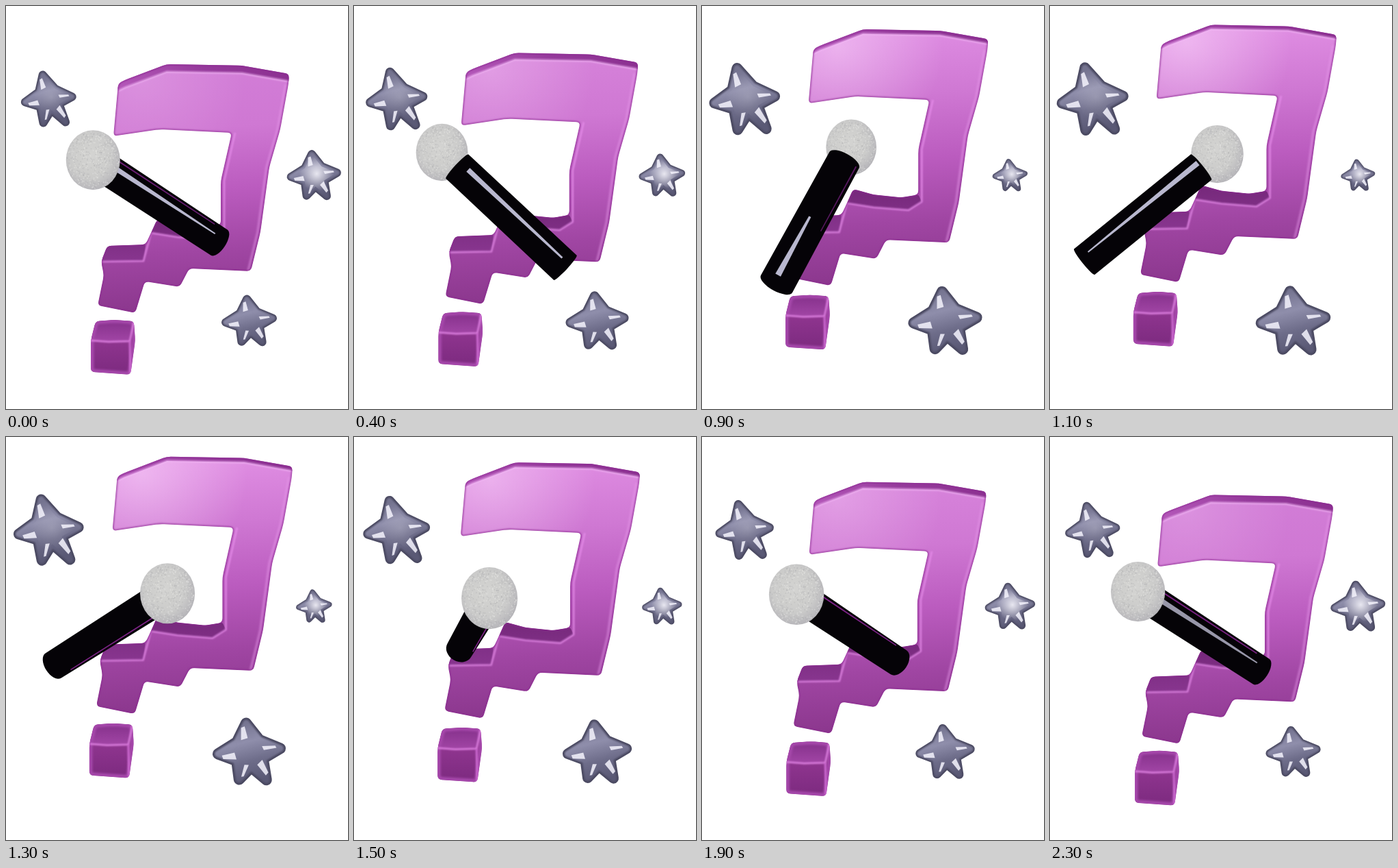
These frames come from a looping animation (500x588 px, 2.4 s). An HTML page with a canvas:

```html
<!DOCTYPE html>
<html lang="en">
<head>
<meta charset="utf-8">
<title>Question mark and microphone</title>
<style>
html, body { margin: 0; width: 100%; height: 100%; overflow: hidden; background: #fff; }
canvas { display: block; }
</style>
</head>
<body>
<canvas id="stage" width="500" height="588"></canvas>
<script>
const ctx = document.getElementById('stage').getContext('2d');
const LOOP = 2400, STEP = 100, TURN = 2 * Math.PI;

const clamp = v => Math.max(0, Math.min(1, v));
const wave = (t, peak, period = LOOP) => Math.cos(TURN * (t - peak) / period);
const rise = (t, peak) => (1 + wave(t, peak)) / 2;

function line(points) {
  const path = new Path2D();
  points.forEach(p => path.lineTo(...p));
  return path;
}
// Closed polygon whose corners are rounded by r
function poly(points, r) {
  const path = new Path2D(), n = points.length;
  const toward = ([x, y], [u, v]) => {
    const k = Math.min(r / Math.hypot(u - x, v - y), 0.5);
    return [x + (u - x) * k, y + (v - y) * k];
  };
  points.forEach((p, i) => {
    path.lineTo(...toward(p, points[(i + n - 1) % n]));
    path.quadraticCurveTo(...p, ...toward(p, points[(i + 1) % n]));
  });
  path.closePath();
  return path;
}
const shift = (points, dx, dy) => points.map(([x, y]) => [x + dx, y + dy]);

function paint(kind, path, color, blur) {
  ctx.filter = blur ? `blur(${blur}px)` : 'none';
  ctx[kind + 'Style'] = color;
  ctx[kind](path);
  ctx.filter = 'none';
}
const fill = (path, color, blur) => paint('fill', path, color, blur);
function stroke(path, color, width, blur) {
  ctx.lineWidth = width;
  paint('stroke', path, color, blur);
}
// Evenly spaced color stops
function blend(gradient, ...colors) {
  colors.forEach((c, i) => gradient.addColorStop(i / (colors.length - 1), c));
  return gradient;
}
const ramp = (x0, y0, x1, y1, ...colors) => blend(ctx.createLinearGradient(x0, y0, x1, y1), ...colors);
const glow = (x, y, r, ...colors) => blend(ctx.createRadialGradient(x, y, 0, x, y, r), ...colors);

// Question mark
const roof = [[164, 113], [174, 108], [235, 85], [345, 87], [414, 99]];
const side = [[413, 114], [401, 180], [385, 235], [372, 330], [358, 387]];
const lowBack = [[148, 350], [204, 348]], lowFront = [[139, 373], [201, 372]];
const highBack = [[221, 311], [250, 319], [290, 323], [314, 319]];
const highFront = [[212, 331], [250, 337], [300, 341], [319, 329]];
const inner = [[314, 255], [330, 185]];
const hook = poly([[157, 190], ...roof, ...side, [268, 383], [254, 410], [203, 402], [189, 448],
  [134, 437], [143, 393], lowFront[0], ...lowBack, highFront[0], ...highBack, ...inner, [225, 180]], 6);
const ledges = [[lowBack, lowFront], [highBack, highFront]]
  .map(([back, front]) => poly([...back, ...[...front].reverse()], 2));

const cubeBack = [[131, 460], [160, 458], [187, 460]];
const cubeFront = [[124, 488], [150, 490], [181, 489]];
const cubeBase = [[182, 538], [124, 534]];
const cube = poly([...cubeBack, [189, 488], ...cubeBase, cubeFront[0]], 6);
const cubeTop = line([...cubeBack, ...[...cubeFront].reverse()]);

function drawHook(q) {
  ctx.save();
  ctx.transform(1 + 0.026 * q, 0, 0, 1 + 0.0353 * q, -5.7 * q, -61 * q);
  ctx.clip(hook);
  const top = `rgb(${210 + 14 * q},${125 + 17 * q},${215 + 12 * q})`;
  fill(hook, ramp(250, 90, 270, 448, top, '#cf78d3', '#bb5cbf', '#a046a3', '#8a368c'));
  fill(hook, glow(200, 110, 150, `rgba(255,225,255,${0.2 + 0.3 * q})`, 'rgba(255,225,255,0)'));
  const rim = shift(roof, 0, 11 - 5 * q);
  fill(line([...rim, [430, 70], [150, 70]]), ramp(160, 0, 415, 0, '#b558ba', '#953a9b', '#8c3191'), 0.7);
  stroke(line(rim), 'rgba(243,184,246,.65)', 3, 1.2);
  ledges.forEach(l => fill(l, ramp(0, 310, 0, 376, '#75287a', '#893690'), 0.6));
  stroke(line([...lowFront, ...highFront, ...shift(inner, 5, 0)]), 'rgba(232,142,236,.8)', 2.5, 1);
  stroke(line(shift(side, -4, 0)), 'rgba(230,150,234,.6)', 3, 1.5);
  stroke(hook, 'rgba(140,44,146,.7)', 3, 0.8);
  ctx.restore();
}

function drawCube(q) {
  ctx.save();
  ctx.transform(1, 0, 0, 1, -2.2 * q, -41.5 * q);
  ctx.clip(cube);
  fill(cube, ramp(0, 488, 0, 538, '#8f358f', '#7c2a7f'));
  fill(cubeTop, ramp(0, 458, 0, 489, '#84308a', '#a145a5'));
  stroke(cube, '#a547aa', 9, 1.5);
  stroke(line([...cubeFront, cubeBack[2]]), '#dd80e0', 2.5, 1);
  stroke(line([cubeFront[2], cubeBase[0]]), '#cd6ad1', 3, 1);
  ctx.restore();
}

// Glass stars: five tips clockwise from the top, relative to the middle
const wide = [[-10, -40], [40, -3], [28, 39], [-9, 41], [-40, 6]];
const slim = [[-4, -37], [40, -4], [22, 36], [-13, 36], [-40, 3]];
const stars = [
  { x: 62.3, y: 135, grow: 0.31, tips: wide, shine: 0.2 },
  { x: 450.3, y: 246.7, grow: -0.38, tips: slim, shine: 0.85 },
  { x: 355.5, y: 459, grow: 0.37, tips: slim, shine: 0 }
];
const reach = ([x, y], r) => [x * r / Math.hypot(x, y), y * r / Math.hypot(x, y)];

function drawStar({ x, y, grow, tips, shine }, s) {
  ctx.save();
  ctx.translate(x, y);
  ctx.scale(1 + grow * s, 1 + grow * s);
  ctx.lineJoin = ctx.lineCap = 'round';
  const valleys = tips.map(([u, v], i) => {
    const [a, b] = tips[(i + 1) % 5];
    return reach([u + a, v + b], 17);
  });
  const shape = line(tips.flatMap((p, i) => [reach(p, Math.hypot(...p) - 6), valleys[i]]));
  shape.closePath();
  fill(shape, '#4b4a62');
  stroke(shape, '#4b4a62', 12);
  const glass = ramp(-8, -32, 8, 32, '#74738f', '#8f8eab', '#6d6c89', '#5a5975');
  fill(shape, glass);
  stroke(shape, glass, 7, 1);
  fill(shape, glow(4, -2, 26, `rgba(250,249,255,${shine})`, 'rgba(250,249,255,0)'));
  // One bright sliver on the left flank of each arm
  tips.forEach((p, i) => {
    const [nx, ny] = reach([p[1], -p[0]], i % 2 ? 3 : 5);
    const at = (k, w) => [p[0] * k + nx * w, p[1] * k + ny * w];
    fill(line([at(0.4, 0), at(0.75, 0.4), at(0.72, 1.2), at(0.36, 1.5)]), 'rgba(244,243,253,.85)', 0.6);
  });
  ctx.restore();
}

// Microphone
let seed = 7;
const random = () => (seed = seed * 16807 % 2147483647) / 2147483647;
const grain = Array.from({ length: 500 }, () => {
  const a = random() * TURN, r = Math.sqrt(random()) * 0.97;
  return [Math.cos(a) * r, Math.sin(a) * r, random() < 0.5 ? 'rgba(150,150,154,.2)' : 'rgba(244,244,242,.3)'];
});

function drawHead(x, y, r) {
  ctx.save();
  ctx.translate(x, y);
  ctx.scale(r, r * 1.1);
  const ball = new Path2D();
  ball.arc(0, 0, 1, 0, TURN);
  fill(ball, glow(-0.1, -0.15, 1.15, '#d4d4d2', '#d0d0ce', '#cbcbca', '#b7b6ba'));
  for (const [u, v, color] of grain) {
    ctx.fillStyle = color;
    ctx.fillRect(u - 0.02, v - 0.02, 0.04, 0.04);
  }
  ctx.restore();
}

function drawHandle([x, y], [tx, ty], angle, lean) {
  const sin = Math.sin(angle), tilt = Math.abs(lean), front = clamp(lean * 1.4);
  const length = Math.hypot(tx - x, ty - y), start = 32 - 20 * tilt;
  const w0 = 23.8 + sin, w1 = 23.3 + 3.5 * sin, cap = 0.08 + 0.58 * tilt;
  ctx.save();
  ctx.translate(x, y);
  ctx.rotate(Math.atan2(ty - y, tx - x));
  const tube = new Path2D();
  tube.ellipse(length, 0, w1 * cap, w1, 0, -TURN / 4, TURN / 4);
  tube.ellipse(start, 0, w0 * cap, w0, 0, TURN / 4, TURN * 3 / 4);
  fill(tube, '#050307');
  ctx.clip(tube);

  const band = (from, to, y, a, b, color, alpha) => {
    const u = start + (length - start) * from, v = start + (length - start) * to;
    ctx.globalAlpha = clamp(alpha);
    fill(line([[u, y - a / 2], [v, y - b / 2], [v, y + b / 2], [u, y + a / 2]]), color);
  };
  band(0.62 * front, 0.94, -8 * Math.cos(angle), 8 - 6 * front, 2 + 9 * front, '#b9b8cf',
    1.3 + 4 * Math.cos(angle - 1.3));
  band(0, 0.9 - 0.5 * front, -0.8 * w0, 2, 1.5, '#7d2386', 2 * tilt - 0.4);
  ctx.restore();
}

function drawMic(t) {
  // A full turn per loop, slow at the right and quick at the left
  const degrees = 0.15 * t - 38 * wave(t, 450) + 5 * wave(t, 700, LOOP / 2);
  const angle = degrees * TURN / 360, cos = Math.cos(angle), sin = Math.sin(angle);
  const tail = [183 + 136 * cos, 362 + 52 * sin];
  const head = [185 - 61 * cos, 219.5 - 16 * sin];
  const lean = sin - 0.3; // positive when the tail points at the viewer
  const layers = [
    () => drawHead(...head, 38.8 - 2.3 * sin),
    () => drawHandle(head, tail, angle, lean)
  ];
  if (lean < -0.12) layers.reverse();
  layers.forEach(draw => draw());
}

function render(now) {
  const t = Math.floor(now % LOOP / STEP) * STEP;
  ctx.fillStyle = '#fff';
  ctx.fillRect(0, 0, 500, 588);
  const lift = rise(t, 1170);
  drawHook(lift);
  drawCube(lift);
  stars.forEach(star => drawStar(star, rise(t, 1070)));
  drawMic(t);
}

let begin;
function tick(now) {
  begin ??= now;
  render(now - begin);
  requestAnimationFrame(tick);
}
requestAnimationFrame(tick);
</script>
</body>
</html>
```
